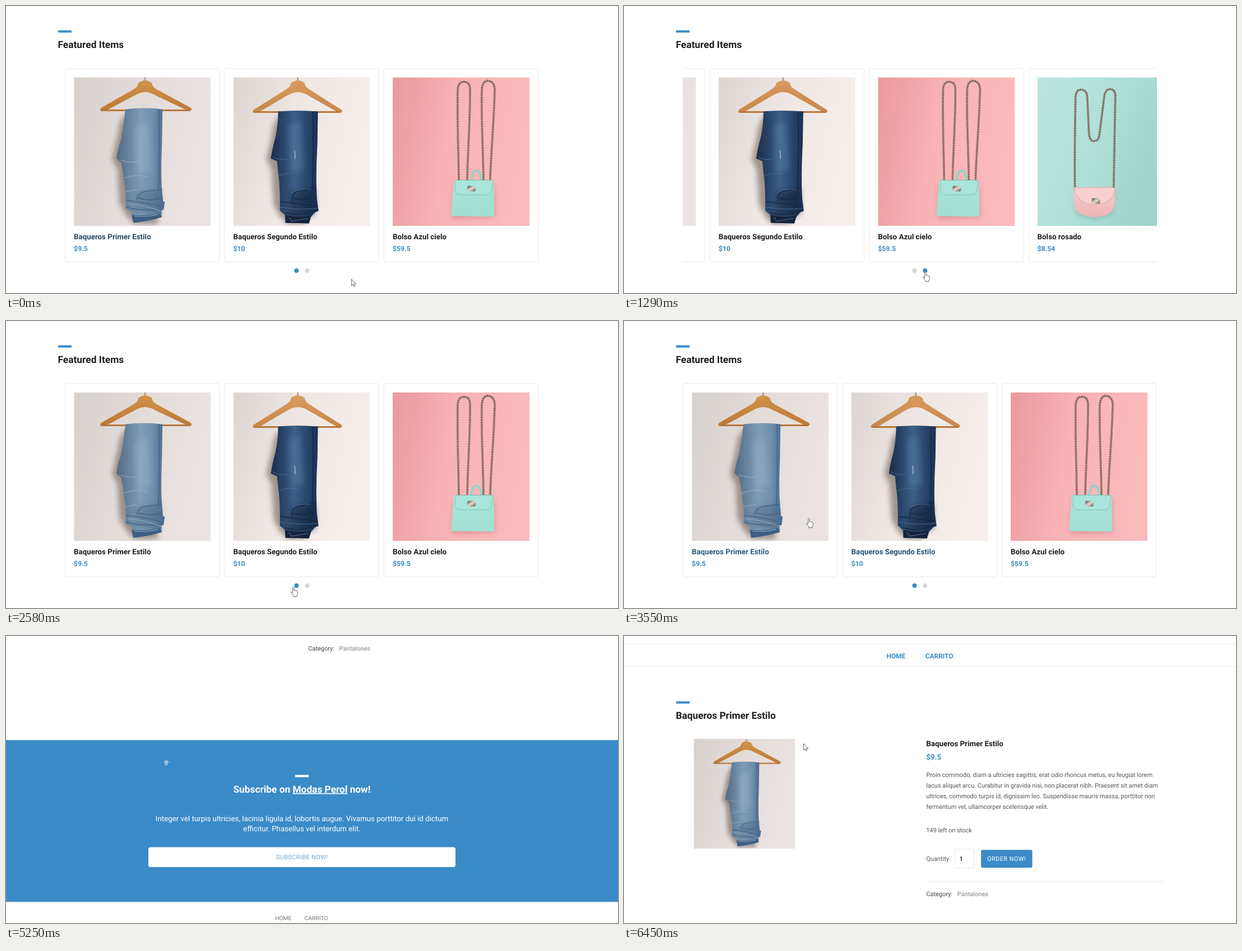
An HTML page for the animation above (7020 ms loop, 1092 by 513 pixels).

```html
<!DOCTYPE html>
<html lang="en">
<head>
<meta charset="utf-8">
<title>Featured Items</title>
<style>
html, body { margin: 0; width: 100%; height: 100%; overflow: hidden; background: #fff; }
svg { display: block; width: 100%; height: 100%; font-family: Roboto, sans-serif; text-rendering: geometricPrecision; }
</style>
</head>
<body>
<svg id="stage" viewBox="0 0 1092 513"></svg>
<script>
const LOOP = 7020, TICK = 80;
const BLUE = '#3b8bc8', INK = '#1f1f1f', BODY = '#555', LINE = '#e9e9e9';
const PITCH = 284.4;

// Moments at which the picture moves: first and last tick of each burst.
const BURSTS = [[80, 240], [480, 880], [1210, 1450], [1690, 1690], [2100, 2180], [2340, 2820],
  [3150, 3790], [4030, 4030], [4520, 4520], [4930, 5010], [5170, 5810], [5890, 6450]];

const text = (x, y, size, str, fill = BODY, weight = 400, more = '') =>
  `<text x="${x}" y="${y}" font-size="${size}" fill="${fill}" font-weight="${weight}" ${more}>${str}</text>`;
const rect = (x, y, w, h, fill, more = '') =>
  `<rect x="${x}" y="${y}" width="${w}" height="${h}" fill="${fill}" ${more}/>`;
const path = (d, fill, more = '') => `<path d="${d}" fill="${fill}" ${more}/>`;
const line = (d, color, width, more = '') => path(d, 'none', `stroke="${color}" stroke-width="${width}" ${more}`);
const haze = (d, color, opacity) => path(d, color, `opacity="${opacity}" filter="url(#soft)"`);
const grad = (id, x2, y2, ...colors) =>
  `<linearGradient id="${id}" x1="0" y1="0" x2="${x2}" y2="${y2}">` +
  colors.map((c, i) => `<stop offset="${i / (colors.length - 1)}" stop-color="${c}"/>`).join('') +
  '</linearGradient>';
const middle = 'text-anchor="middle"';

const defs = '<defs>' +
  grad('wallA', 1, 0.3, '#d6d1cd', '#e4dcd9', '#ebe3e1') +
  grad('wallB', 1, 0.3, '#dcd5d1', '#efe7e4', '#f6eeeb') +
  grad('pink', 1, 0.2, '#ea999d', '#f9b3b6', '#fbbabc') +
  grad('mint', 1, 0.4, '#bce6df', '#b1e0d8', '#a0d3ca') +
  grad('wood', 0, 1, '#d0934a', '#bb7a36') +
  grad('woodB', 0, 1, '#d99c5e', '#c58748') +
  grad('denimA', 1, 0, '#506a85', '#66849f', '#7f9cb6', '#7190ae', '#4a6a8d') +
  grad('denimB', 1, 0, '#1b2c48', '#284468', '#3d5f87', '#2a476d', '#1b2f4e') +
  grad('bagMint', 0, 1, '#aae6da', '#a0dfd1') +
  grad('bagPink', 0, 1, '#f7cbcb', '#eeb4b7') +
  grad('metal', 1, 1, '#4b4038', '#e4dcd4', '#5d5047') +
  '<filter id="soft" x="-50%" y="-50%" width="200%" height="200%"><feGaussianBlur stdDeviation="5"/></filter>' +
  '<clipPath id="shelf"><rect x="105" y="105" width="846" height="360"/></clipPath>' +
  '<clipPath id="photo"><rect width="244" height="265.5"/></clipPath></defs>';

// Wooden hanger: apex x, both tips, height of the bar.
function hanger(cx, left, right, y, wood) {
  return line(`M${cx} 0V6`, '#a49a92', 2.5) +
    path(`M${left} ${y + 2}Q${left - 1} ${y - 3} ${left + 6} ${y - 6}L${cx - 20} 21Q${cx - 13} 17 ${cx - 12} 10
      Q${cx} 1 ${cx + 12} 10Q${cx + 13} 17 ${cx + 20} 21L${right - 6} ${y - 6}Q${right + 1} ${y - 3} ${right} ${y + 1}
      L${right - 10} ${y}L${cx + 18} 32Q${cx} 21 ${cx - 18} 32L${left + 11} ${y + 1}Z`, `url(#${wood})`) +
    line(`M${left + 2} ${y + 1}H${right - 2}`, '#b8763a', 3);
}

const creases = (color, width, ...list) =>
  list.map(d => line(d, color, width, 'stroke-linecap="round"')).join('');

function lightJeans() {
  const legs = `M92 57Q125 53 158 57L157 120Q155 170 157 200L159 221L162 223L160 237L156 238L157 250
    Q130 258 106 260L103 245L106 242L92 234Q94 210 90 190Q87 165 84 152L76 145Q78 128 84 112Q89 85 92 57Z`;
  return rect(0, 0, 244, 266, 'url(#wallA)') +
    haze('M92 66L82 82L76 112L68 146L78 165L81 225L94 248L108 262L150 262L120 70Z', '#7d7068', 0.7) +
    hanger(127, 47, 210, 58, 'wood') + path(legs, 'url(#denimA)') +
    haze('M108 90L132 80L137 165L112 175Z', '#9cb8cf', 0.4) +
    haze('M112 205L154 200L154 245L110 240Z', '#3f5d7d', 0.4) +
    creases('#45627f', 1.4, 'M152 58Q153 130 151 204', 'M93 220Q120 222 159 232', 'M112 218Q116 203 135 203L157 200',
      'M116 216Q135 222 157 216', 'M94 232Q120 240 158 236') +
    creases('#9db6ca', 0.9, 'M84 148Q105 155 118 150', 'M90 180Q112 172 132 178', 'M96 226Q125 228 158 240', 'M93 205Q105 200 114 202') +
    path('M103 246Q130 248 152 243L156 250Q130 258 106 260Z', '#3d5f84') +
    line('M108 248Q130 250 150 245', '#7d9ab5', 1.5);
}

function darkJeans() {
  const legs = `M80 61Q115 58 151 61L150 120Q147 170 149 215L152 239L146 241L139 249L135 261L93 260L92 246
    L83 238Q84 200 80 170L78 150L67 145Q70 125 75 108Q80 85 80 61Z`;
  return rect(0, 0, 244, 266, 'url(#wallB)') +
    haze('M80 70L72 85L67 112L59 146L68 165L72 228L84 250L98 262L130 262L110 70Z', '#7d7068', 0.7) +
    hanger(115, 35, 194, 61, 'woodB') + path(legs, 'url(#denimB)') +
    haze('M98 85L120 78L126 165L102 170Z', '#5d83a9', 0.4) +
    haze('M104 205L146 200L146 245L98 255Z', '#101d33', 0.5) +
    creases('#14253f', 1.4, 'M142 62Q143 140 141 200', 'M84 222Q115 226 150 230', 'M105 222Q103 204 120 203L147 197',
      'M108 216Q130 222 138 214', 'M92 242Q120 250 149 238') +
    creases('#4f7096', 0.9, 'M104 206Q118 199 138 200', 'M84 232Q120 238 150 234', 'M82 176Q98 168 118 174', 'M70 142Q84 150 96 146') +
    line('M109 131Q111 138 110 146', '#a3b7cb', 1.5) +
    path('M93 246Q115 252 138 247L135 261L93 260Z', '#15233c') +
    line('M99 250L104 257L134 252', '#4f6d8f', 1.2);
}

const chain = (d, color) =>
  line(d, color, 2) + line(d, color, 4, 'stroke-dasharray="2.6 1.7"') +
  line(d, '#c9a996', 1, 'stroke-dasharray="1.4 2.9"');
const clasp = (x, y) => rect(x, y, 15, 10, 'url(#metal)', 'rx="3"');

function mintBag() {
  return rect(0, 0, 244, 266, 'url(#pink)') +
    haze('M110 192L180 192L182 250L106 252Z', '#b96b70', 0.5) +
    chain('M118 184C117 120 115 80 116 22Q117 8 127 8Q139 8 138 25C138 80 134 130 133 183', '#83665a') +
    chain('M162 184C161 120 158 80 159 22Q160 7 170 6Q183 8 182 25C180 90 175 140 174 184', '#83665a') +
    line('M140 185Q142 167 149 167Q157 167 158 185', '#8fd5c6', 4) +
    path('M111 184H179Q181 192 181 246Q181 249 178 249L107 248Q103 248 104 244L109 188Q109 184 111 184Z', 'url(#bagMint)') +
    path('M112 184H179L177 201Q176 210 166 210H123Q111 210 111 201Z', '#a9e5da', 'stroke="#7fc4b5" stroke-width="1"') +
    clasp(133, 194);
}

function pinkBag() {
  return rect(0, 0, 244, 266, 'url(#mint)') +
    haze('M66 205L140 205L134 245L102 254L70 245Z', '#6fa59c', 0.5) +
    chain('M67 200C66 150 67 100 68 35Q69 22 78 22Q88 22 89 36L92 100Q93 114 101 114Q110 114 111 100L119 36Q121 21 130 21Q140 22 139 36L136 200', '#7a6a5e') +
    path('M66 197H138Q140 226 134 238Q125 249 102 250Q78 248 69 238Q62 226 66 197Z', 'url(#bagPink)') +
    path('M66 197H138Q139 215 122 223Q102 232 84 224Q66 214 66 197Z', '#f9d0d0', 'stroke="#dfa3a6" stroke-width="1"') +
    clasp(97, 216);
}

const items = [
  ['Baqueros Primer Estilo', '$9.5', lightJeans],
  ['Baqueros Segundo Estilo', '$10', darkJeans],
  ['Bolso Azul cielo', '$59.5', mintBag],
  ['Bolso rosado', '$8.54', pinkBag]
];

const card = ([name, price, art], i) =>
  `<g transform="translate(${105.5 + i * PITCH} 111.5)">` +
  rect(0, 0, 275.5, 346, '#fff', 'rx="3" stroke="#ebebeb"') +
  `<g transform="translate(15.7 16)"><g clip-path="url(#photo)">${art()}</g></g>` +
  text(15.6, 305.5, 13.34, name, INK, 700, `id="name${i}"`) +
  text(15.6, 326.3, 12.3, price, BLUE, 700) + '</g>';

const shop = '<g id="shop">' + rect(93, 43.5, 24, 4, BLUE) +
  text(92.4, 75.2, 17.4, 'Featured Items', INK, 700) +
  `<g clip-path="url(#shelf)"><g id="track">${items.map(card).join('')}</g></g>` +
  '<circle id="dot0" cx="518.4" cy="473" r="4"/><circle id="dot1" cx="537.3" cy="473" r="4"/></g>';

const blurb = ['Proin commodo, diam a ultricies sagittis, erat odio rhoncus metus, eu feugiat lorem',
  'lacus aliquet arcu. Curabitur in gravida nisi, non placerat nibh. Praesent sit amet diam',
  'ultrices, commodo turpis id, dignissim leo. Suspendisse mauris massa, porttitor non',
  'fermentum vel, ullamcorper scelerisque velit.'];

const product = '<g id="product">' +
  rect(0, 14, 1092, 1, LINE) + rect(0, 54, 1092, 1, LINE) +
  text(468.4, 40, 11.9, 'HOME', BLUE, 700) + text(537.8, 40, 11.9, 'CARRITO', BLUE, 700) +
  rect(93, 116.8, 24, 4, BLUE) + text(92.4, 148.2, 17.3, items[0][0], INK, 700) +
  `<g transform="translate(124.5 184) scale(.74 .738)"><g clip-path="url(#photo)">${lightJeans()}</g></g>` +
  text(539.3, 196.6, 13.34, items[0][0], INK, 700) + text(539.3, 221, 13.34, '$9.5', BLUE, 700) +
  blurb.map((s, i) => text(539.3, 252.2 + i * 18.8, 10.97, s)).join('') +
  text(539.3, 351, 10.97, '149 left on stock') +
  text(539.3, 402.2, 10.97, 'Quantity:') +
  rect(591, 381.2, 33.5, 33.5, '#fff', `stroke="${LINE}"`) + text(598.5, 402.2, 10.97, '1', '#333', 700) +
  rect(637, 382.3, 91.5, 32, BLUE, 'rx="3"') +
  text(648, 402.2, 10.97, 'ORDER NOW!', '#fff', 400, 'letter-spacing=".39"') +
  line('M540 438.5H963', '#e3e3e3', 1) +
  text(539.3, 464.5, 10.97, 'Category:', '#444') + text(594.6, 464.5, 11, 'Pantalones', '#999', 500) +
  rect(0, 625, 1092, 289.3, BLUE) + rect(516, 687.3, 24, 4, '#fff') +
  text(528, 718.8, 17.3, 'Subscribe on <tspan text-decoration="underline">Modas Perol</tspan> now!', '#fff', 700, middle) +
  text(528, 769.5, 13.32, 'Integer vel turpis ultricies, lacinia ligula id, lobortis augue. Vivamus porttitor dui id dictum', '#fff', 400, middle) +
  text(528, 788.3, 13.32, 'efficitur. Phasellus vel interdum elit.', '#fff', 400, middle) +
  rect(254, 816.5, 548, 35.5, '#fff', 'rx="3.5"') +
  text(528, 838, 10.97, 'SUBSCRIBE NOW!', '#3179b1', 300, middle + ' letter-spacing=".39"') +
  text(480.2, 947, 10.3, 'HOME', '#777') + text(532.6, 947, 10.3, 'CARRITO', '#777') + '</g>';

const cursors =
  path('M.5 .5V12L3.2 9.5L5 13.6L6.8 12.8L5 8.8H8.6Z', '#fff', 'id="arrow" stroke="#3c3c4a" stroke-width=".8"') +
  path(`M4 .8Q5.4 .2 6 1.6V6.5Q7.2 5.8 8 6.8Q9.3 6.2 10 7.4Q11.6 7 12.3 8.6V12Q12.2 14 11 15.5V17.6H5V16
    Q3 13.5 1 11Q.2 9.2 2 9.2L3.6 10.7V1.8Q3.5 1 4 .8Z`, '#fff', 'id="hand" stroke="#444" stroke-width=".8"') +
  '<g id="pan" stroke="#fff" stroke-width="1"><path d="M4 .5L7.8 4.5H.2Z"/><circle cx="4" cy="7.7" r="2"/></g>' +
  `<g id="anchor" fill="${BLUE}" stroke="#fff"><path d="M9 .5L12 4.5H6ZM9 18.5L12 14.5H6ZM.5 9.5L4.5 6.5V12.5ZM17.5 9.5L13.5 6.5V12.5Z"/>` +
  '<circle cx="9" cy="9.5" r="2"/></g>';

document.getElementById('stage').innerHTML = defs + shop + product + cursors;
const el = id => document.getElementById(id);
const set = (id, name, value) => el(id).setAttribute(name, value);
const show = (id, on) => set(id, 'display', on ? 'inline' : 'none');
const clamp = x => Math.min(1, Math.max(0, x));

function snap(t) {
  let last = 0;
  for (const [a, b] of BURSTS) if (t >= a) last = Math.min(b, a + Math.floor((t - a) / TICK) * TICK);
  return last;
}

// Value list at time t, straight between keys.
function along(keys, t) {
  const i = keys.findIndex(k => k[0] > t);
  if (i < 0) return keys[keys.length - 1].slice(1);
  if (i === 0) return keys[0].slice(1);
  const a = keys[i - 1], b = keys[i], p = (t - a[0]) / (b[0] - a[0]);
  return a.slice(1).map((v, j) => v + (b[j + 1] - v) * p);
}

// The CSS "ease" curve.
function ease(x) {
  let lo = 0, hi = 1, s;
  for (let i = 0; i < 20; i++) {
    s = (lo + hi) / 2;
    if (0.75 * s * (1 - s) + s ** 3 < x) lo = s; else hi = s;
  }
  return 0.3 * s * (1 - s) ** 2 + 3 * s * s * (1 - s) + s ** 3;
}

const slide = (t, start) => ease(clamp((t - start) / 250));
const tint = p => `rgb(${Math.round(31 + 28 * p)},${Math.round(31 + 108 * p)},${Math.round(31 + 169 * p)})`;

const POINTER = [[0, 616, 488], [240, 580, 487], [480, 572, 485], [880, 533, 475], [1689, 533, 475], [1690, 528, 475],
  [2099, 528, 475], [2100, 521, 475], [2180, 515, 475], [2340, 513, 475], [2580, 508, 475], [2820, 508, 471],
  [3070, 508, 471], [3230, 476, 450], [3390, 400, 402], [3550, 325, 352], [3710, 281, 325], [3790, 276, 322],
  [4929, 276, 322], [4930, 274, 294], [5010, 274, 294], [5170, 281, 260], [5250, 282, 221], [5570, 259.5, 213.5],
  [5810, 280, 208], [5890, 290, 204], [6450, 320, 192]];
const SCROLL = [[5090, 0], [5170, 3], [5250, 11], [5330, 68], [5410, 168], [5490, 275], [5570, 361],
  [5650, 410], [5730, 436], [5810, 446], [6050, 449], [6450, 450]];

function draw(time) {
  const t = snap(time), inShop = t < 4030;
  show('shop', inShop);
  show('product', !inShop);

  const shift = slide(t, 1157) - slide(t, 2290);
  set('track', 'transform', `translate(${-shift * PITCH} 0)`);
  set('dot0', 'fill', t < 1210 || t >= 2180 ? BLUE : '#d6d6d6');
  set('dot1', 'fill', t >= 800 && t < 2340 ? BLUE : '#d6d6d6');
  const first = t < 300 ? 0.4 * clamp(1 - t / 240) : clamp((t - 3390) / 300);
  set('name0', 'fill', tint(first));
  set('name1', 'fill', tint(clamp((t - 3150) / 300) * clamp((3690 - t) / 300)));

  set('product', 'transform', `translate(0 ${along(SCROLL, t)[0] - 450})`);

  const [x, y] = along(POINTER, t);
  const kind = t < 800 || t >= 5890 ? 'arrow' : t < 4520 ? 'hand' : t < 4930 ? '' : t < 5170 ? 'anchor' : 'pan';
  for (const id of ['arrow', 'hand', 'anchor', 'pan']) {
    show(id, id === kind);
    set(id, 'transform', `translate(${x} ${y})`);
  }
  set('hand', 'stroke-opacity', inShop ? 1 : 0.25);
  set('pan', 'fill', t < 5330 ? BLUE : '#4a4f4c');
}

const begin = performance.now();
function frame() {
  draw((performance.now() - begin) % LOOP);
  requestAnimationFrame(frame);
}
frame();
</script>
</body>
</html>
```
